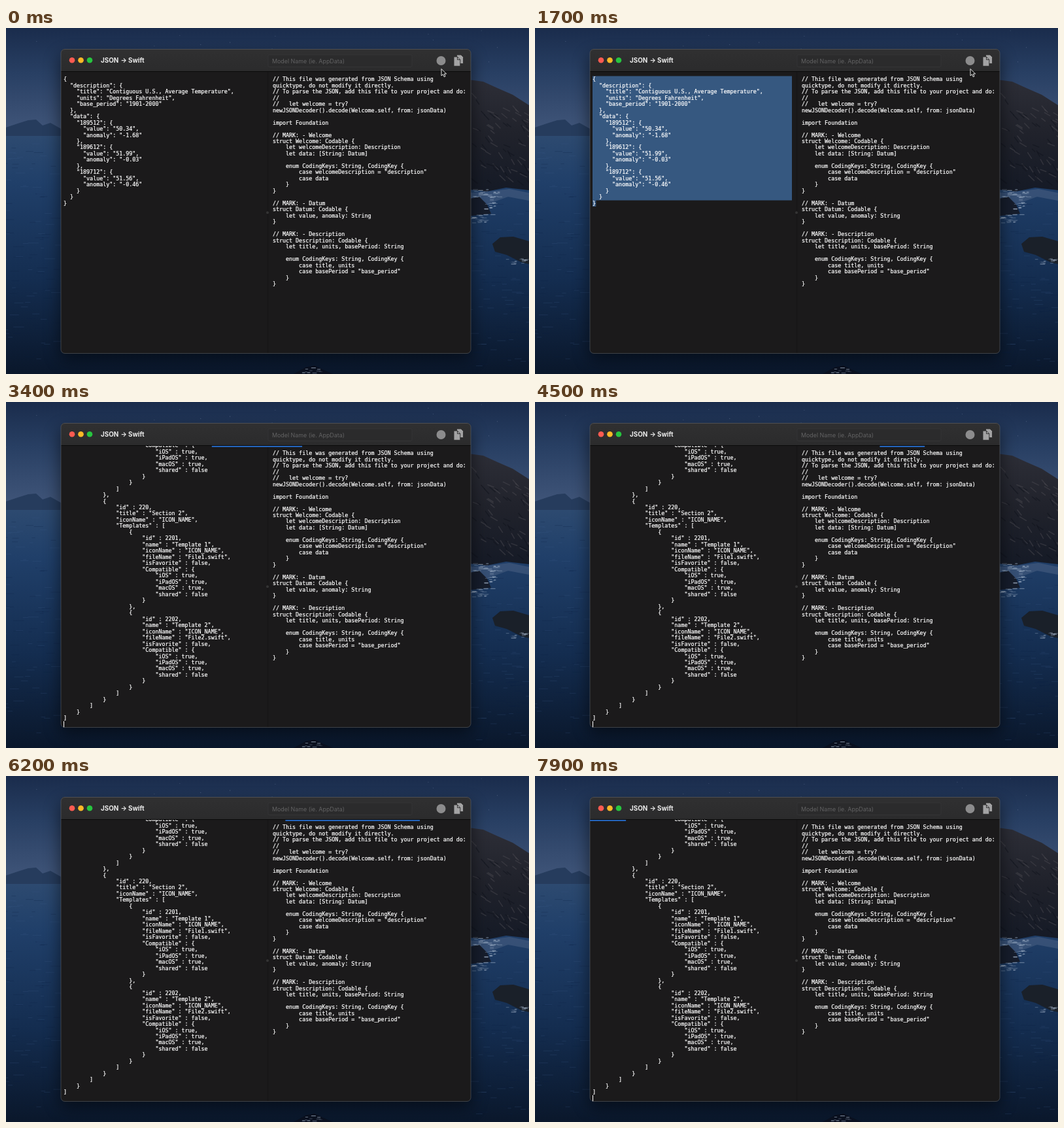
These frames come from a looping animation (800 px wide and 529 px high, 8 s). An HTML page:

```html
<!DOCTYPE html>
<html lang="en">
<head>
<meta charset="utf-8">
<title>JSON to Swift</title>
<style>
  html, body { margin: 0; width: 100%; height: 100%; overflow: hidden; background: #14284a; }
  svg { display: block; width: 100vw; height: 100vh; }
  .code { font: 8.33px "DejaVu Sans Mono", "Noto Sans Mono", monospace; fill: #fff; stroke: #fff; stroke-width: .22; }
  .code text { white-space: pre; }
  .ui { font-family: Inter, "Open Sans", sans-serif; }
</style>
</head>
<body>
<svg viewBox="0 0 800 529" preserveAspectRatio="none">
  <defs>
    <linearGradient id="sky" x2="0" y2="1">
      <stop stop-color="#1a2c4c"/><stop offset=".4" stop-color="#283f63"/>
      <stop offset=".7" stop-color="#364c70"/><stop offset="1" stop-color="#43587c"/>
    </linearGradient>
    <linearGradient id="sea" x2="0" y2="1">
      <stop stop-color="#2d4a70"/><stop offset=".2" stop-color="#203f69"/>
      <stop offset=".6" stop-color="#142d50"/><stop offset="1" stop-color="#0a172b"/>
    </linearGradient>
    <linearGradient id="cliff" x2="0" y2="1">
      <stop stop-color="#2d2e37"/><stop offset=".5" stop-color="#20222b"/><stop offset="1" stop-color="#151a26"/>
    </linearGradient>
    <linearGradient id="header" x2="0" y2="1">
      <stop stop-color="#303031"/><stop offset="1" stop-color="#2b2b2c"/>
    </linearGradient>
    <filter id="soft" x="-20%" y="-20%" width="140%" height="140%"><feGaussianBlur stdDeviation="12"/></filter>
    <filter id="haze"><feGaussianBlur stdDeviation=".7"/></filter>
    <clipPath id="frame"><rect x="84" y="32" width="627" height="465.5" rx="6"/></clipPath>
    <clipPath id="body"><rect x="84" y="67" width="627" height="430.5"/></clipPath>
  </defs>

  <rect width="800" height="170" fill="url(#sky)"/>
  <g id="stars" fill="#9fb0cc"/>
  <rect y="164" width="800" height="365" fill="url(#sea)"/>
  <path d="M0 152 18 146 34 141 46 140 56 149 68 145 84 154V165H0Z" fill="#263c5d"/>
  <g id="waves" stroke-linecap="round"/>
  <g filter="url(#haze)">
    <path d="M700 78 730 82 752 92 775 102 800 118V248L765 244 735 250 700 246Z" fill="url(#cliff)"/>
    <g id="ridges" stroke-linecap="round"/>
    <path d="M704 252 738 250 770 246 800 252V264L768 258 740 268 704 274Z" fill="#4c6284" opacity=".55"/>
    <path d="M704 262 724 258 736 270 742 284 704 288Z" fill="#161d2c"/>
    <path d="M744 330 756 320 776 319 800 326V361L788 358 766 347 748 342Z" fill="#1a2029"/>
    <path d="M440 529 458 519 472 516 484 522 500 529Z" fill="#0b1120"/>
    <g id="foam" stroke="#a3b4c9" stroke-linecap="round"/>
  </g>

  <rect x="82" y="42" width="631" height="464" rx="8" opacity=".5" filter="url(#soft)"/>
  <g clip-path="url(#frame)">
    <rect x="84" y="32" width="627" height="466" fill="#1b1a1b"/>
    <rect x="84" y="32" width="627" height="35" fill="url(#header)"/>
    <rect x="84" y="66" width="627" height="1" fill="#0b0b0b"/>
    <rect x="399" y="67" width="3" height="431" fill="#181718"/>
    <circle cx="400" cy="282.3" r="2" fill="#343434"/>
  </g>
  <rect x="84" y="32.5" width="627" height="465" rx="6" fill="none" stroke="#707276" stroke-opacity=".6" stroke-width=".8"/>

  <circle cx="101" cy="49.3" r="4.3" fill="#ff5b51"/>
  <circle cx="114.5" cy="49.3" r="4.3" fill="#fdb827"/>
  <circle cx="128" cy="49.3" r="4.3" fill="#27c53f"/>
  <g class="ui">
    <text y="52.8" font-size="9.8" font-weight="700" fill="#ececec"><tspan x="145">JSON</tspan><tspan x="175.5">→</tspan><tspan x="187">Swift</tspan></text>
    <rect x="401" y="41" width="220" height="18.5" rx="2" fill="#2b2b2c" stroke="#373738" stroke-width=".8"/>
    <text x="407" y="53.6" font-size="8.9" fill="#626263">Model Name (ie. AppData)</text>
  </g>
  <circle cx="665.5" cy="50" r="7" fill="#8c8c8d"/>
  <g fill="#a3a3a4" stroke="#2d2d2e" stroke-width=".9">
    <path d="M689.5 41H696L699.5 44.5V54.5H689.5Z"/>
    <path d="M685 44H690.5L694.8 48.5V58.3H685Z"/>
    <path d="M690.5 44V48.5H694.8" fill="none"/>
  </g>

  <g clip-path="url(#body)">
    <path id="selection" d="M88 73.5H393V263.5H93.3V273H88Z" fill="#365880"/>
    <g class="code" id="before"></g>
    <g class="code" id="after"></g>
    <g class="code" id="output"></g>
    <rect id="caret" width="1" height="9.5" fill="#fff"/>
    <rect id="bar" y="67" height="2" fill="#2565bd"/>
  </g>
  <path id="pointer" d="M0 0V10.5L2.5 8.3 4.2 12.2 6 11.4 4.3 7.6H7.6Z" fill="#111" stroke="#fff" stroke-width=".9"/>
</svg>

<script>
const LOOP = 8000, STEP = 100, LINE = 9.48;
const PASTE = 1800, SELECT = 1200, BLINK = 560;
const $ = id => document.getElementById(id);

function add(parent, tag, attrs, content = '') {
  const el = document.createElementNS('http://www.w3.org/2000/svg', tag);
  for (const name in attrs) el.setAttribute(name, attrs[name]);
  el.textContent = content;
  parent.append(el);
}

function write(id, x, y, lines) {
  lines.forEach((line, i) => line && add($(id), 'text', { x, y: y + i * LINE }, line));
}

const reading = (id, value, anomaly, end) => [
  `    "${id}": {`, `      "value": "${value}",`, `      "anomaly": "${anomaly}"`, '    }' + end];

write('before', 88, 81.2, [
  '{', '  "description": {',
  '    "title": "Contiguous U.S., Average Temperature",',
  '    "units": "Degrees Fahrenheit",',
  '    "base_period": "1901-2000"',
  '  },', '  "data": {',
  ...reading(189512, '50.34', '-1.68', ','),
  ...reading(189612, '51.99', '-0.03', ','),
  ...reading(189712, '51.56', '-0.46', ''),
  '  }', '}']);

const indent = (columns, lines) => lines.map(line => ' '.repeat(columns) + line);
const platforms = [
  ...indent(24, ['"Compatible" : {']),
  ...indent(28, ['"iOS" : true,', '"iPadOS" : true,', '"macOS" : true,', '"shared" : false']),
  ...indent(24, ['}'])];
const template = (n, end) => [
  ...indent(20, ['{']),
  ...indent(24, [`"id" : 220${n},`, `"name" : "Template ${n}",`, '"iconName" : "ICON_NAME",',
    `"fileName" : "File${n}.swift",`, '"isFavorite" : false,']),
  ...platforms,
  ...indent(20, ['}' + end])];
const closing = [...indent(16, [']'])];

const pasted = [
  ...platforms, ...indent(20, ['}']), ...closing,
  ...indent(12, ['},', '{']),
  ...indent(16, ['"id" : 220,', '"title" : "Section 2",', '"iconName" : "ICON_NAME",', '"Templates" : [']),
  ...template(1, ','), ...template(2, ''), ...closing,
  ...indent(12, ['}']), ...indent(8, [']']), ...indent(4, ['}']), ']'];
write('after', 88, 486.3 - (pasted.length - 1) * LINE, pasted);

write('output', 408, 81.2, `// This file was generated from JSON Schema using
quicktype, do not modify it directly.
// To parse the JSON, add this file to your project and do:
//
//   let welcome = try?
newJSONDecoder().decode(Welcome.self, from: jsonData)

import Foundation

// MARK: - Welcome
struct Welcome: Codable {
    let welcomeDescription: Description
    let data: [String: Datum]

    enum CodingKeys: String, CodingKey {
        case welcomeDescription = "description"
        case data
    }
}

// MARK: - Datum
struct Datum: Codable {
    let value, anomaly: String
}

// MARK: - Description
struct Description: Codable {
    let title, units, basePeriod: String

    enum CodingKeys: String, CodingKey {
        case title, units
        case basePeriod = "base_period"
    }
}`.split('\n'));

// Seeded texture for the landscape
let seed = 7;
const random = () => (seed = seed * 16807 % 2147483647) / 2147483647;
const between = (a, b) => a + random() * (b - a);

for (let i = 0; i < 25; i++) {
  add($('stars'), 'circle', { cx: between(0, 800), cy: between(0, 75), r: .5, opacity: between(.2, .6) });
}
for (let i = 0; i < 220; i++) {
  const x = random() < .5 ? between(-10, 84) : between(705, 800);
  add($('waves'), 'path', {
    d: `M${x} ${between(172, 525)}h${between(4, 16)}`,
    stroke: random() < .5 ? '#3b5a87' : '#0c1f40', opacity: .25 });
}
for (let i = 0; i < 70; i++) {
  const x = between(711, 800), top = 90 + (x - 711) * .45;
  add($('ridges'), 'path', {
    d: `M${x} ${between(top, 235)}l${between(4, 11)} ${between(3, 9)}`,
    stroke: random() < .5 ? '#4a4950' : '#10131c', 'stroke-width': 1.5, opacity: .5 });
}
function foam(count, x, y, width, height) {
  for (let i = 0; i < count; i++) {
    add($('foam'), 'path', {
      d: `M${between(x, x + width)} ${between(y, y + height)}h${between(2, 7)}`,
      'stroke-width': between(.6, 1.6), opacity: between(.25, .7) });
  }
}
foam(30, 709, 246, 45, 14);
foam(22, 709, 284, 28, 14);
foam(14, 732, 262, 18, 24);
foam(14, 765, 352, 32, 9);
foam(10, 450, 519, 38, 9);

const clamp = v => Math.min(1, Math.max(0, v));
const show = (id, on) => { $(id).style.display = on ? '' : 'none'; };

// Pointer stops: time, x, y
const path = [[2600, 666, 62.5], [2800, 665, 51], [3000, 665, 51], [3400, 801, 512]];
function pointerAt(t) {
  const next = path.findIndex(stop => t < stop[0]);
  if (next < 0) return path.at(-1).slice(1);
  if (next === 0) return path[0].slice(1);
  const a = path[next - 1], b = path[next], k = (t - a[0]) / (b[0] - a[0]);
  return [1, 2].map(i => a[i] + (b[i] - a[i]) * k);
}

// The bar sweeps right, then left; its head outruns its tail
function drawBar(t) {
  const START = 2998, SWEEP = 1302, HEAD = 683, TAIL = 1092, WIDTH = 627;
  const since = t - START, turn = Math.floor(since / SWEEP), local = since - turn * SWEEP;
  const head = clamp(local / HEAD) * WIDTH, tail = clamp(local / TAIL) * WIDTH;
  show('bar', since >= 0 && head > tail);
  $('bar').setAttribute('x', 84 + (turn % 2 ? WIDTH - head : tail));
  $('bar').setAttribute('width', head - tail);
}

function draw(t) {
  const done = t >= PASTE;
  show('before', !done);
  show('after', done);
  show('selection', t >= SELECT && !done);
  show('caret', done ? Math.floor((t - PASTE) / BLINK) % 2 === 0 : t >= 100 && t < 700);
  $('caret').setAttribute('x', done ? 88 : 93);
  $('caret').setAttribute('y', done ? 488 : 263.5);
  $('pointer').setAttribute('transform', `translate(${pointerAt(t)})`);
  show('pointer', t < 3400);
  drawBar(t);
}

const began = performance.now();
function tick() {
  const t = (performance.now() - began) % LOOP;
  draw(Math.floor(t / STEP) * STEP);
  requestAnimationFrame(tick);
}
tick();
</script>
</body>
</html>
```
